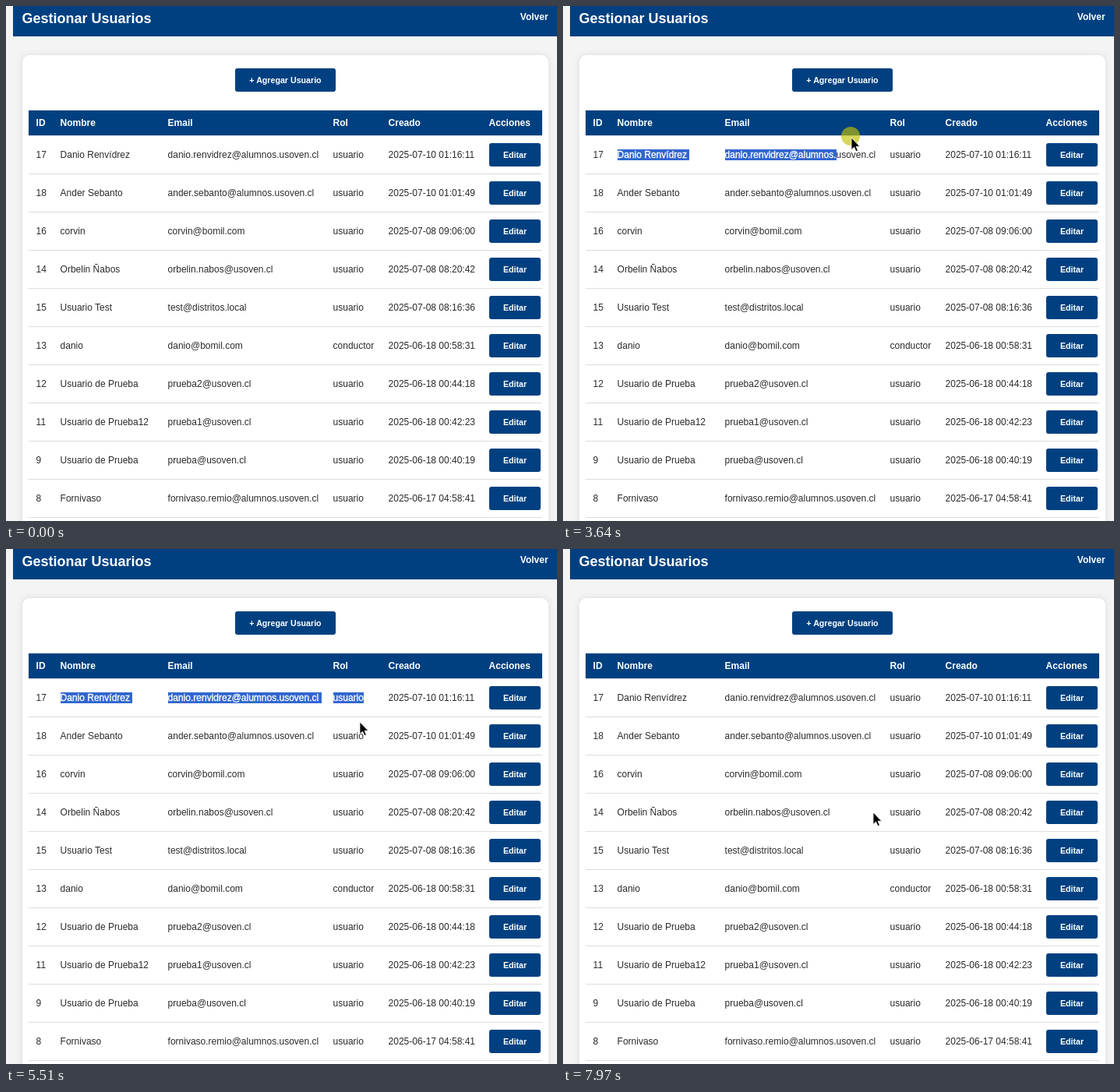
Write an HTML page that moves like this. It is 707 by 661 pixels and loops after 8000 ms.

```html
<!DOCTYPE html>
<html lang="es">
<head>
<meta charset="utf-8">
<title>Gestionar Usuarios</title>
<style>
  html, body { margin: 0; height: 100%; overflow: hidden; background: #f4f4f4; }
  svg { display: block; font: 12px "Liberation Sans", Arial, sans-serif; fill: #2b2b2b; }
  text { white-space: pre; }
  .blue { fill: #004080; }
  .bold { font-weight: bold; fill: #fff; }
  .small { font-size: 10.667px; text-anchor: middle; }
  .title { font-size: 18px; }
  .card { fill: #fff; filter: drop-shadow(0 0 4px rgba(0, 0, 0, .1)); }
  .line { fill: #ddd; }
  .mark { fill: #3066cf; }
  .picked { fill: #fff; stroke: #fff; stroke-width: .35; }
</style>
</head>
<body>
<svg id="stage" width="707" height="661" viewBox="0 0 707 661">
  <g id="page"></g>
  <g id="selection"></g>
  <g id="pointer">
    <circle id="halo" cx="-1" cy="-2" r="12" fill-opacity=".65"/>
    <path id="arrow" d="M0 0V15.5L3.6 12.2 6 17.6 8.4 16.6 6.1 11.3H10.8Z" fill="#000" stroke="#fff" stroke-width=".8"/>
    <path id="beam" d="M-3.5-7.5H-1L0-6.5 1-7.5H3.5M0-6.5V6.5M-3.5 7.5H-1L0 6.5 1 7.5H3.5" fill="none" stroke="#222"/>
  </g>
</svg>
<script>
const LOOP = 8000, ROW_TOP = 166, ROW_HEIGHT = 49, SELECT_LAG = 70;
const columns = [38.6, 69.6, 207.6, 419.6, 490.6, 619.6];
const headings = ["ID", "Nombre", "Email", "Rol", "Creado", "Acciones"];
const users = [
  ["17", "Danio Renvídrez", "danio.renvidrez@alumnos.usoven.cl", "usuario", "2025-07-10 01:16:11"],
  ["18", "Ander Sebanto", "ander.sebanto@alumnos.usoven.cl", "usuario", "2025-07-10 01:01:49"],
  ["16", "corvin", "corvin@bomil.com", "usuario", "2025-07-08 09:06:00"],
  ["14", "Orbelin Ñabos", "orbelin.nabos@usoven.cl", "usuario", "2025-07-08 08:20:42"],
  ["15", "Usuario Test", "test@distritos.local", "usuario", "2025-07-08 08:16:36"],
  ["13", "danio", "danio@bomil.com", "conductor", "2025-06-18 00:58:31"],
  ["12", "Usuario de Prueba", "prueba2@usoven.cl", "usuario", "2025-06-18 00:44:18"],
  ["11", "Usuario de Prueba12", "prueba1@usoven.cl", "usuario", "2025-06-18 00:42:23"],
  ["9", "Usuario de Prueba", "prueba@usoven.cl", "usuario", "2025-06-18 00:40:19"],
  ["8", "Fornivaso", "fornivaso.remio@alumnos.usoven.cl", "usuario", "2025-06-17 04:58:41"]
];

const $ = id => document.getElementById(id);
const show = (id, visible) => $(id).style.display = visible ? "" : "none";
const rowTop = row => ROW_TOP + row * ROW_HEIGHT;

function add(parent, tag, attributes, content = "") {
  const node = document.createElementNS("http://www.w3.org/2000/svg", tag);
  for (const name in attributes) node.setAttribute(name, attributes[name]);
  node.textContent = content;
  return parent.appendChild(node);
}
const box = (x, y, width, height, style, rx = 0) =>
  add($("page"), "rect", { x, y, width, height, rx, class: style });
const label = (x, y, content, style = "") =>
  add($("page"), "text", { x, y, class: style }, content);
function button(x, y, width, content) {
  box(x, y, width, 30, "blue", 3);
  label(x + width / 2, y + 19, content, "bold small");
}

// Page
box(9, 0, 698, 39, "blue");
label(20.4, 22, "Gestionar Usuarios", "bold title");
label(659.8, 18, "Volver", "bold");
box(21, 63, 675, 640, "card", 9.6);
button(294, 80, 129, "+ Agregar Usuario");
box(29, 134, 659, 32, "blue");
box(29, ROW_TOP, 659, 1, "line");
headings.forEach((heading, i) => label(columns[i], 154, heading, "bold"));
const cells = users.map((user, row) => {
  const top = rowTop(row);
  box(29, top + ROW_HEIGHT, 659, 1, "line");
  button(620, top + 10, 66, "Editar");
  return user.map((content, i) => label(columns[i], top + 29, content));
});

// Pointer story: each call advances the clock
const moves = [], drags = [];
let clock = 0, spot = [697, 632];
const wait = ms => { clock += ms; };
function move(ms, x, y) {
  moves.push({ from: clock, ms, start: spot, end: [x, y] });
  spot = [x, y];
  clock += ms;
}
const clear = () => drags.forEach(drag => { drag.cleared = Math.min(drag.cleared, clock); });
function dragRow(row, path) {
  clear();
  const drag = { row, pressed: clock, cleared: LOOP };
  drags.push(drag);
  path();
  drag.released = clock;
}

wait(80);
move(790, 180, 178);
wait(50);
move(380, 515, 450);
move(390, 364, 187);
wait(280);
move(350, 612, 184);
move(310, 489, 230);
move(490, 65, 191);
wait(30);
dragRow(0, () => { move(490, 370, 169); move(220, 462, 190); });
move(550, 534, 18);
move(300, 85, 244);
wait(240);
move(340, 448, 240);
wait(180);
move(210, 512, 56);
move(400, 63, 288);
dragRow(2, () => { wait(90); move(340, 462, 290); });
move(140, 545, 98);
move(210, 97, 361);
move(220, 71, 338);
wait(30);
dragRow(3, () => move(420, 472, 338));
wait(210);
move(110, 540, 154);
clear();
move(120, 398, 338);

function pointerAt(time) {
  const { from, ms, start, end } = moves.filter(m => m.from <= time).pop() || moves[0];
  const u = Math.min(1, Math.max(0, (time - from) / ms)), eased = u * u * (3 - 2 * u);
  return start.map((value, i) => value + (end[i] - value) * eased);
}

// Highlights the name, email and role cells as far as the pointer has reached
const marks = [1, 2, 3].map(column => ({
  column,
  rect: add($("selection"), "rect", { x: Math.round(columns[column]), height: 14, class: "mark" }),
  text: add($("selection"), "text", { x: columns[column], class: "picked" })
}));

function drawSelection(time) {
  const drag = drags.find(d => time >= d.pressed && time < d.cleared);
  show("selection", drag);
  if (!drag) return;
  const top = rowTop(drag.row);
  const reach = pointerAt(Math.min(time - SELECT_LAG, drag.released))[0];
  const visible = time - SELECT_LAG >= drag.pressed;
  for (const { column, rect, text } of marks) {
    const cell = cells[drag.row][column], content = cell.textContent;
    const widthOf = count => count ? cell.getSubStringLength(0, count) : 0;
    let count = 0;
    while (visible && count < content.length &&
      columns[column] + (widthOf(count) + widthOf(count + 1)) / 2 < reach) count++;
    const space = count === content.length && column < 3 ? 3 : 0;
    rect.setAttribute("y", top + 18);
    rect.setAttribute("width", Math.round(widthOf(count) + space));
    text.setAttribute("y", top + 29);
    text.textContent = content.slice(0, count);
  }
}

function overText(x, y) {
  const row = Math.floor((y - ROW_TOP) / ROW_HEIGHT), offset = y - rowTop(row);
  return row >= 0 && row < cells.length && offset >= 17 && offset <= 32 &&
    cells[row].some((cell, i) => x >= columns[i] && x <= columns[i] + cell.getComputedTextLength());
}

function drawPointer(time) {
  const [x, y] = pointerAt(time), beam = overText(x, y);
  const held = drags.find(d => time >= d.pressed && time < d.released);
  show("pointer", time >= moves[0].from);
  show("halo", held);
  show("arrow", !beam);
  show("beam", beam);
  $("pointer").setAttribute("transform", `translate(${Math.round(x)} ${Math.round(y)})`);
  // The halo darkens while the button stays down
  if (held) $("halo").style.fill = `hsl(60, 100%, ${50 - 12 * Math.min(1, (time - held.pressed) / 400)}%)`;
}

const start = performance.now();
function frame() {
  const time = (performance.now() - start) % LOOP;
  drawSelection(time);
  drawPointer(time);
  requestAnimationFrame(frame);
}
frame();
</script>
</body>
</html>
```
